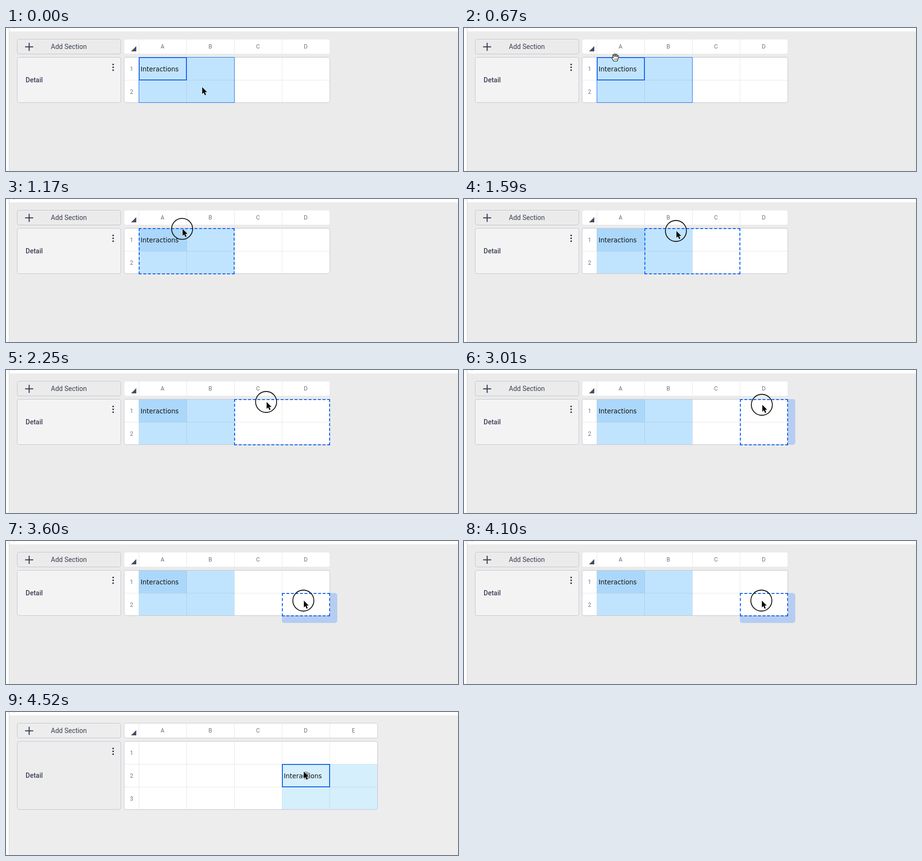
Recreate the animation shown at these times as an HTML page. Size 947 by 300 pixels, loop 5.42 s.

```html
<!DOCTYPE html>
<html lang="en">
<head>
<meta charset="utf-8">
<title>Dragging a cell selection</title>
<style>
  html, body { margin: 0; width: 100%; height: 100%; overflow: hidden; background: #fff; }
  svg { position: absolute; left: 0; top: 0; }
  text { font-family: Roboto, Arial, sans-serif; }
  .head { font-size: 12px; fill: #6e7385; text-anchor: middle; }
  .label { font-size: 14px; fill: #3a4055; }
  .bold { font-weight: 500; }
  .value { font: 13.4px "DejaVu Sans", Verdana, sans-serif; fill: #111; }
  #drop { position: absolute; box-sizing: border-box; border: 2px dashed #0f62f5; }
</style>
</head>
<body>
<svg id="stage" width="947" height="300"></svg>
<div id="drop"></div>
<svg id="pointer" width="947" height="300">
  <g id="hand" fill="#fff" stroke="#111" stroke-width="1.1" stroke-linejoin="round">
    <path d="M-3.5 7.5 C-4.5 4.5 -7 2.5 -7.4 .3 C-7.4 -1.3 -5.6 -1.4 -4.3 .6
      L-5.6 -4.4 C-5.9 -6.4 -3.8 -6.8 -3.3 -5 L-2.2 -1.6 L-2.2 -6.3 C-2.2 -8.4 .1 -8.4 .2 -6.4
      L.5 -1.7 L1.7 -6 C2.2 -7.8 4.2 -7.2 3.9 -5.3 L3.2 -1.2 L5 -3.6 C6.1 -5 7.6 -4 6.9 -2.4
      C5.7 .2 6 4 4 7.5 Z"/>
    <path d="M-1.2 2V5M1.1 2V5M3.2 2V5" stroke-width=".8"/>
  </g>
  <circle id="ring" r="22" fill="none" stroke="#111" stroke-width="1.8"/>
  <path id="arrow" d="M0 0V14.6L3.3 11.5L5.6 17L8.2 15.9L5.9 10.6H10.4Z"
    fill="#0a0a0a" stroke="#fff" stroke-width="1.1" stroke-linejoin="round" paint-order="stroke"/>
</svg>
<script>
const LOOP = 5420, STEP = 83.7, LAST = 54;
const GRAB = 6, PRESS = 10, RELEASE = 51;
const X0 = 278, Y0 = 61, COL = 100, ROW = 48;

// step, x, y of the pointer tip
const path = [
  [0, 411, 124], [1, 405, 120], [6, 312, 54], [10, 312, 54], [12, 340, 61], [19, 445, 67],
  [27, 546, 67], [35, 625, 73], [37, 625, 73], [41, 624, 125], [54, 624, 125]
];

const $ = id => document.getElementById(id);
const colX = c => X0 + c * COL;
const rowY = r => Y0 + r * ROW;

const rect = (x, y, w, h, fill, stroke = "none", rx = 0, sw = 1) =>
  `<rect x="${x}" y="${y}" width="${w}" height="${h}" rx="${rx}" fill="${fill}" stroke="${stroke}" stroke-width="${sw}"/>`;
const text = (x, y, cls, s) => `<text x="${x}" y="${y}" class="${cls}">${s}</text>`;
const line = (d, stroke, w = 1) => `<path d="${d}" stroke="${stroke}" stroke-width="${w}" fill="none"/>`;
const cells = (c, r, w, h, fill) => rect(colX(c) + .5, rowY(r) + .5, w * COL, h * ROW - .5, fill);

function chrome(bg, card, rows) {
  const edge = "#c3c5cf", h = rows * ROW;
  let s = rect(6, 7, 941, 293, bg) + line("M6.5 0V300", "#d3d3d6")
    + line("M14 -1Q17 2 20 -1", "#aaa")
    + rect(23.5, 23.5, 217, 31, bg, edge, 4)
    + line("M40 39.5H57M48.5 31V48", "#30364b", 2)
    + text(94, 44, "label", "Add Section")
    + rect(23.5, 61.5, 217, h - 1, card, edge, 4)
    + text(41, Y0 + h / 2 + 5, "label bold", "Detail");
  for (const y of [76.5, 82.5, 88.5]) s += `<circle cx="224.5" cy="${y}" r="1.7" fill="#30364b"/>`;
  return s;
}

function grid(cols, rows, headEdge, fills) {
  const w = X0 - 247 + cols * COL, h = rows * ROW, rule = "rgba(30,30,60,.1)";
  let s = rect(247.5, 23.5, w, 31, "#fff", headEdge, 4)
    + '<path d="M273 38V49H262Z" fill="#484d5e"/>'
    + rect(247.5, 61.5, w, h - 1, "#fff", "none", 4) + fills;
  for (let c = 0; c < cols; c++) {
    const x = colX(c) + .5;
    s += line(`M${x} 24V54M${x} 62V${Y0 + h - 1}`, rule)
      + text(colX(c) + 50, 43, "head", "ABCDE"[c]);
  }
  for (let r = 0; r < rows; r++) {
    if (r) s += line(`M248 ${rowY(r) + .5}H${247 + w}`, rule);
    s += text(263, rowY(r) + 29, "head", r + 1);
  }
  return s + rect(247.5, 61.5, w, h - 1, "none", "#c3c5cf", 4);
}

const value = (c, r) => text(colX(c) + 4, rowY(r) + 30, "value", "Interactions");
const active = (c, r) => rect(colX(c) + 1, rowY(r) + 1, 99, 47, "none", "#1463e6", 0, 2);

const before = chrome("#ebebeb", "#f4f3f4", 2);
const faint = "#e9e9ec", blue = "#c0e4fe";
const scenes = {
  idle: before + grid(4, 2, faint, cells(0, 0, 2, 2, blue))
    + rect(278.5, 61.5, 200, 95, "none", "#1f6be8") + active(0, 0) + value(0, 0),
  drag: before + '<g id="shade"></g>'
    + grid(4, 2, faint, cells(0, 0, 2, 2, blue) + cells(0, 0, 1, 1, "#abd7fa")) + value(0, 0),
  done: chrome("#ededed", "#ededee", 3)
    + grid(5, 3, "#c9cbd3", cells(3, 1, 2, 2, "#d5effd")) + active(3, 1) + value(3, 1)
};

function pointerAt(n) {
  const i = Math.max(1, path.findIndex(p => p[0] >= n));
  const [a, ax, ay] = path[i - 1], [b, bx, by] = path[i];
  const k = (n - a) / (b - a);
  return [ax + (bx - ax) * k, ay + (by - ay) * k];
}

const show = (id, on) => { $(id).style.display = on ? "" : "none"; };
const move = (id, x, y) => $(id).setAttribute("transform", `translate(${x} ${y})`);

let scene = "", shown = -1;

function draw(n) {
  const [x, y] = pointerAt(n);
  const dragging = n >= PRESS && n < RELEASE;
  const next = dragging ? "drag" : n < PRESS ? "idle" : "done";
  if (next !== scene) $("stage").innerHTML = scenes[scene = next];

  const open = n >= GRAB && n < PRESS;
  show("hand", open || next === "done");
  $("hand").style.opacity = open ? 1 : .45;
  move("hand", x + 5, y + 8);
  show("arrow", !open);
  move("arrow", x, y);
  show("ring", dragging);
  move("ring", x - 1, y);
  show("drop", dragging);
  if (!dragging) return;

  // The 2 x 2 block is clipped by the table; any excess shows as a shaded rim.
  const c = Math.floor((x - X0) / COL), r = y > rowY(1) ? 1 : 0;
  const w = Math.min(2, 4 - c) * COL, h = (2 - r) * ROW;
  Object.assign($("drop").style, {
    left: colX(c) + "px", top: rowY(r) + "px", width: w + 1 + "px", height: h + 1 + "px"
  });
  $("shade").innerHTML = c < 3 ? "" :
    rect(colX(c), rowY(r), 116, h + (r ? 15 : 0), "#b6cdf1", "none", 5);
}

function tick() {
  const n = Math.min(LAST, Math.floor((performance.now() % LOOP + 10) / STEP));
  if (n !== shown) draw(shown = n);
  requestAnimationFrame(tick);
}
tick();
</script>
</body>
</html>
```
